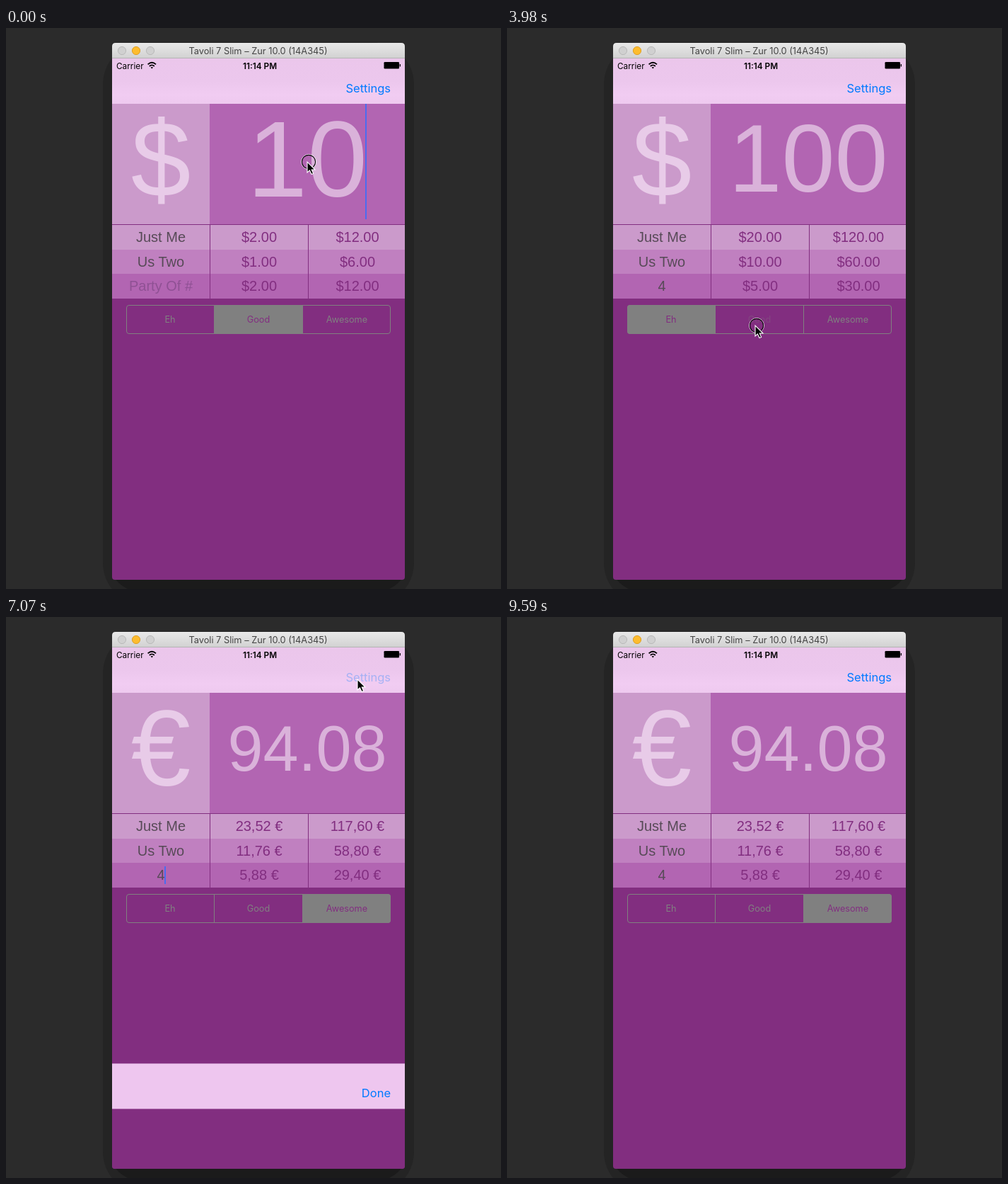
Animation, 700 px wide and 792 px high, one loop 9730 ms. Source, as an HTML page:

```html
<!DOCTYPE html>
<html lang="en">
<head>
<meta charset="utf-8">
<title>Tip calculator</title>
<style>
  html, body { margin: 0; width: 100%; height: 100%; overflow: hidden; background: #2b2b2b; }
  svg { display: block; width: 700px; height: 792px; }
  text { font-family: Inter, Roboto, sans-serif; }
  .mid { text-anchor: middle; }
  .end { text-anchor: end; }
  .arial text { font-family: "Liberation Sans", Arial, sans-serif; text-anchor: middle; }
  .row { font-size: 20px; }
  .name { fill: #574a57; }
  .money { fill: #822e80; }
  .link { font-size: 16.5px; fill: #007aff; }
  .seg { font-size: 12.7px; }
  .rule { stroke: #822e80; }
  .caret { fill: #4a6cf0; }
</style>
</head>
<body>
<svg viewBox="0 0 700 792">
  <defs>
    <linearGradient id="chrome" x2="0" y2="1">
      <stop stop-color="#e9e9e9"/><stop offset="1" stop-color="#d1d1d1"/>
    </linearGradient>
    <linearGradient id="wash" x2="0" y2="1">
      <stop stop-color="#ebc6eb"/><stop offset=".5" stop-color="#ecc7ed"/>
      <stop offset=".8" stop-color="#f1ccf2"/><stop offset="1" stop-color="#eec9ef"/>
    </linearGradient>
    <clipPath id="screen"><path d="M150 43H564V775Q564 779 560 779H154Q150 779 150 775Z"/></clipPath>
    <clipPath id="pill"><rect x="170" y="391" width="374" height="41" rx="4"/></clipPath>
  </defs>

  <rect width="700" height="792" fill="#2b2b2b"/>
  <rect x="137" y="20" width="440" height="795" rx="60" fill="#242424"/>
  <path d="M153 775H561Q556 785 542 792H172Q158 785 153 775Z" fill="#1b1b1b"/>

  <path d="M150 43V26Q150 21 155 21H559Q564 21 564 26V43Z" fill="url(#chrome)"/>
  <path d="M150 42.5H564" stroke="#b4b4b4"/>
  <g fill="#d0d0d0" stroke="#b9b9b9">
    <circle cx="164" cy="32" r="5.6"/>
    <circle cx="184" cy="32" r="5.6" fill="#fdbc2f" stroke="#dfa023"/>
    <circle cx="204" cy="32" r="5.6"/>
  </g>
  <text class="mid" x="356.5" y="37" font-size="12.8" fill="#444">Tavoli 7 Slim – Zur 10.0 (14A345)</text>

  <g clip-path="url(#screen)">
    <rect x="150" y="43" width="414" height="736" fill="#822e80"/>
    <rect x="150" y="43" width="414" height="64" fill="url(#wash)"/>
    <text id="settings" class="link end" x="544" y="91">Settings</text>

    <rect x="150" y="107" width="138" height="170" fill="#cb9acb"/>
    <rect x="288" y="107" width="276" height="170" fill="#b265b2"/>
    <rect x="150" y="278" width="414" height="35" fill="#cb9acb"/>
    <rect x="150" y="313" width="414" height="34" fill="#c080c0"/>
    <rect x="150" y="347" width="414" height="35" fill="#b265b2"/>
    <path class="rule" d="M150 277.5H564M288.5 277V382M427.5 277V382"/>

    <g class="arial">
      <text id="sign" x="219" y="238" font-size="152" fill="#e8cbe8"></text>
      <text id="bill" x="426" fill="#dab2da"></text>
      <g id="table" class="row"></g>
    </g>
    <rect id="billCaret" class="caret" width="2"/>
    <rect id="partyCaret" class="caret" y="352" width="2" height="25"/>

    <g id="segments" clip-path="url(#pill)"></g>
    <rect x="170.5" y="391.5" width="373" height="40" rx="3.5" fill="none" stroke="#808080"/>
    <path d="M294.5 391V432M419.5 391V432" stroke="#808080"/>

    <g id="sheet">
      <rect x="150" width="414" height="736" fill="#822e80"/>
      <rect x="150" width="414" height="64" fill="#eec6ef"/>
      <text id="done" class="link end" x="544" y="48">Done</text>
    </g>

    <text x="156" y="57.5" font-size="11.8">Carrier</text>
    <g fill="none" stroke="#000" stroke-width="1.8">
      <path d="M200.6 51.4Q206.3 46.2 212 51.4M202.8 54Q206.3 50.8 209.8 54"/>
      <path d="M206.3 57.6L204.6 55.6Q206.3 54.2 208 55.6Z" fill="#000" stroke="none"/>
    </g>
    <text class="mid" x="359" y="57.5" font-size="11.8" font-weight="600">11:14 PM</text>
    <rect x="534.5" y="48" width="21.5" height="9.5" rx="1.2"/>
    <rect x="556.7" y="51" width="1.3" height="3.5"/>
  </g>

  <g id="pointer">
    <g id="ring" fill="none">
      <circle cx="2" r="10.5" stroke="#fff" stroke-opacity=".8"/>
      <circle cx="2" r="9.6" stroke="#000" stroke-width="1.1"/>
    </g>
    <path d="M0 0V15L3.4 11.9L6 17.5L8.6 16.4L6.2 11H11Z" stroke="#fff" stroke-width="1.1"/>
  </g>
</svg>
<script>
const LOOP = 9730, STEP = 147.4, LAST = 65;
const $ = id => document.getElementById(id);

function add(parent, tag, attrs, text = '') {
  const el = document.createElementNS('http://www.w3.org/2000/svg', tag);
  for (const key in attrs) el.setAttribute(key, attrs[key]);
  el.textContent = text;
  return parent.appendChild(el);
}
const set = (el, attrs) => { for (const key in attrs) el.setAttribute(key, attrs[key]); };
const show = (el, on) => el.setAttribute('visibility', on ? 'visible' : 'hidden');
const within = (t, from, to) => t >= from && t < to;

const rows = ['Just Me', 'Us Two', ''].map((label, i) => {
  const y = [302, 337, 371][i];
  const cell = (x, cls, text) => add($('table'), 'text', { x, y, class: cls }, text);
  return { name: cell(219, 'name', label), tip: cell(358, 'money'), total: cell(497, 'money') };
});

const segments = ['Eh', 'Good', 'Awesome'].map((label, i) => ({
  box: add($('segments'), 'rect', { x: 170 + 125 * i, y: 391, width: 125, height: 41, fill: '#808080' }),
  text: add($('segments'), 'text', { x: 232 + 125 * i, y: 416, class: 'seg mid' }, label)
}));

// time, x, y of the pointer tip
const path = [
  [0, 426, 189], [500, 426, 189], [1180, 240, 392], [1400, 216, 364],
  [2280, 216, 364], [2800, 253, 413], [3250, 253, 413], [3830, 351, 420],
  [4290, 351, 420], [4560, 470, 424], [4720, 470, 424], [5011, 354, 316],
  [5450, 217, 191], [6100, 217, 191], [6900, 497, 88], [7250, 497, 88],
  [7800, 512, 90], [8640, 512, 90], [9450, 666, 770], [9560, 720, 830], [LOOP, 720, 830]
];
const presses = [
  [0, 140], [1320, 1470], [2940, 3240], [3970, 4120],
  [4560, 4710], [5590, 5880], [6920, 7070], [7950, 8100]
];

function pointerAt(t) {
  const i = Math.max(1, path.findIndex(p => p[0] >= t));
  const [t0, x0, y0] = path[i - 1], [t1, x1, y1] = path[i];
  const u = (t - t0) / (t1 - t0);
  return [x0 + (x1 - x0) * u, y0 + (y1 - y0) * u];
}

function easeOut(t, start, length) {
  const u = Math.min(1, Math.max(0, (t - start) / length));
  return 1 - (1 - u) ** 3;
}

function drawBill(t, euro) {
  const [text, size, y] = t < 140 ? ['10', 153, 238] : euro ? ['94.08', 90, 217] : ['100', 135, 231];
  $('sign').textContent = euro ? '€' : '$';
  $('bill').textContent = text;
  set($('bill'), { 'font-size': size, y });
  set($('billCaret'), t < 140 ? { x: 508, y: 107, height: 163 } : { x: 535.5, y: 109, height: 148 });
  show($('billCaret'), t < 1470);
  return +text;
}

function drawTable(t, bill, euro) {
  const rate = t < 3240 ? .2 : t < 3970 ? .15 : t < 4710 ? .2 : .25;
  const typed = t >= 2200;
  const money = v => euro ? v.toFixed(2).replace('.', ',') + ' €' : '$' + v.toFixed(2);
  [1, 2, typed ? 4 : 1].forEach((people, i) => {
    rows[i].tip.textContent = money(bill * rate / people);
    rows[i].total.textContent = money(bill * (1 + rate) / people);
  });
  const party = rows[2].name;
  party.textContent = typed ? '4' : 'Party Of #';
  party.style.fill = typed ? '' : '#8f5194';
  set($('partyCaret'), { x: typed ? 224 : 172 });
  show($('partyCaret'), within(t, 1470, 2940) || within(t, 5880, 7600));
}

function drawSegments(t) {
  const chosen = t < 3240 ? 1 : t < 4120 ? 0 : t < 4710 ? 1 : 2;
  const pressed = [[2940, 3240], [3970, 4120], [4560, 4710]].findIndex(p => within(t, ...p));
  segments.forEach((s, i) => {
    show(s.box, i === chosen);
    set(s.text, { fill: i === chosen ? '#822e80' : '#808080', opacity: i === pressed ? .3 : 1 });
  });
}

function drawSheet(t) {
  const up = easeOut(t, 7039, 500) - easeOut(t, 8090, 500);
  set($('sheet'), { transform: `translate(0 ${779 - 736 * up})` });
  set($('settings'), { opacity: within(t, 6920, 7600) ? .3 : 1 });
  set($('done'), { opacity: within(t, 7950, 8100) ? .2 : 1 });
}

function draw(now) {
  // the screen refreshes in even steps
  const t = Math.min(LAST, Math.floor((now % LOOP + 6) / STEP)) * STEP;
  const euro = t >= 5730;
  drawTable(t, drawBill(t, euro), euro);
  drawSegments(t);
  drawSheet(t);
  set($('pointer'), { transform: `translate(${pointerAt(t)})` });
  show($('ring'), presses.some(p => within(t, ...p)));
  requestAnimationFrame(draw);
}
draw(0);
</script>
</body>
</html>
```
